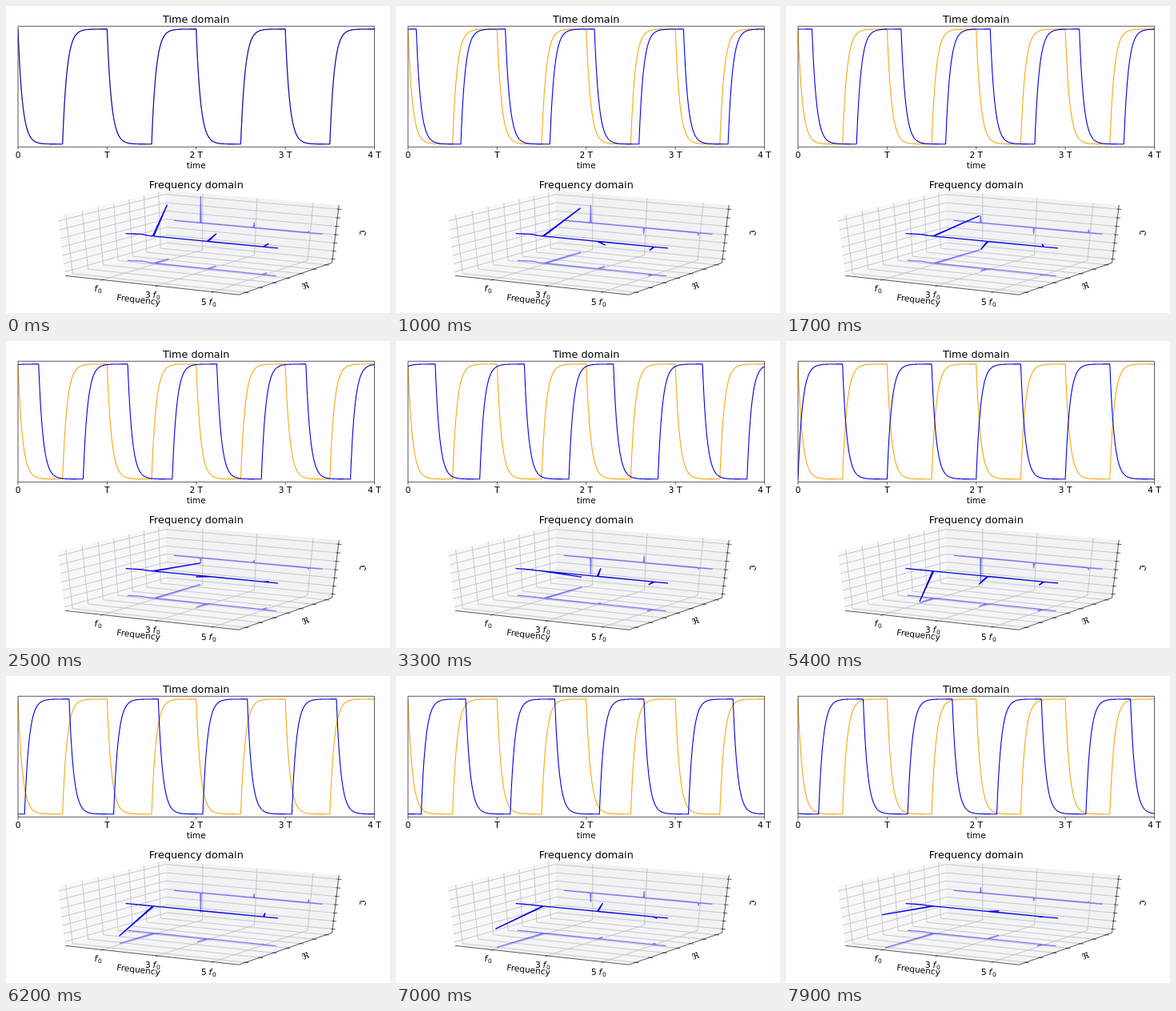
An HTML page with a canvas for the animation above (8000 ms loop, 480 by 384 pixels).

```html
<!DOCTYPE html>
<html>
<head>
<meta charset="utf-8">
<style>
html, body { margin: 0; width: 100%; height: 100%; overflow: hidden; background: #fefdff; }
canvas { display: block; }
</style>
</head>
<body>
<canvas id="stage" width="480" height="384"></canvas>
<script>
const ctx = document.getElementById('stage').getContext('2d');
const FONT = '"DejaVu Sans", sans-serif';
const TAU = 0.05;            // low-pass time constant, in periods
const EDGE = 0.5 + 1 / 48;   // half size of the 3D box
const LEFT = 15, TOP = 25.3, WIDTH = 445.5, HEIGHT = 151;
const SIN = 0.5, COS = Math.sqrt(3) / 2;
const HARMONICS = [1, 3, 5];
const GRID = [-3, -2, -1, 0, 1, 2, 3].map(i => i * 0.15);
const BLUE = '#0000e0', AXIS = '#222';
const freqPos = f => (f / 5.5 - 0.5) / 1.1;

// Perspective view: azimuth -60, elevation 30, distance 10.
function project(x, y, z) {
  const near = SIN * x - COS * y;
  const depth = 10 - near * COS - z * SIN;
  return [243.5 + 2405 * (COS * x + SIN * y) / depth,
          293.6 - 808 * (z * COS - near * SIN) / depth];
}

function trace(points) {
  ctx.beginPath();
  points.forEach(p => ctx.lineTo(p[0], p[1]));
}

function line(points, color, width) {
  trace(points);
  ctx.strokeStyle = color;
  ctx.lineWidth = width;
  ctx.stroke();
}

const line3 = (points, color, width) => line(points.map(p => project(...p)), color, width);

function pane(corners, color) {
  trace(corners.map(p => project(...p)));
  ctx.fillStyle = color;
  ctx.fill();
}

function text(str, x, y, size, angle = 0) {
  ctx.save();
  ctx.translate(x, y);
  ctx.rotate(angle * Math.PI / 180);
  ctx.font = size + 'px ' + FONT;
  ctx.textAlign = 'center';
  ctx.fillStyle = '#000';
  ctx.fillText(str, 0, 0);
  ctx.restore();
}

function freqLabel(num, x, y) {
  ctx.fillStyle = '#000';
  for (const [str, dx, dy, font] of [
    [num, 0, 0, '10.6px '],
    ['f', num ? 9.5 : 0, 0, 'italic 10.6px '],
    ['0', num ? 14 : 4.5, 2, '7.5px ']
  ]) {
    ctx.font = font + FONT;
    ctx.textAlign = 'left';
    ctx.fillText(str, x + dx, y + dy);
  }
}

function signal(t) {
  const p = t - Math.floor(t);
  return p < 0.5 ? 2 * Math.exp(-p / TAU) - 1 : 1 - 2 * Math.exp((0.5 - p) / TAU);
}

function drawWave(shift, color) {
  const points = [];
  for (let i = 0; i <= 1782; i++) {
    const t = i / 1782 * 4;
    points.push([LEFT + t / 4 * WIDTH, TOP + HEIGHT / 2 * (1 - signal(t - shift) / 1.05)]);
  }
  line(points, color, 1.1);
}

function drawTime(shift) {
  ctx.save();
  ctx.beginPath();
  ctx.rect(LEFT, TOP, WIDTH, HEIGHT);
  ctx.clip();
  drawWave(0, '#f8a810');
  drawWave(shift, BLUE);
  ctx.restore();
  ctx.strokeStyle = AXIS;
  ctx.lineWidth = 0.75;
  ctx.strokeRect(LEFT, TOP, WIDTH, HEIGHT);
  ['0', 'T', '2 T', '3 T', '4 T'].forEach((label, i) => {
    const x = LEFT + i * WIDTH / 4;
    line([[x, TOP + HEIGHT], [x, TOP + HEIGHT + 3.2]], AXIS, 0.75);
    text(label, x, 190, 10.6);
  });
  text('time', 237.7, 203, 10.6);
  text('Time domain', 237.7, 21, 12.8);
}

// Points [frequency, real, imaginary] of the shifted signal's spectrum.
function spectrum(shift) {
  const points = [];
  const ripple = 0.01 * (1 + Math.cos(2 * Math.PI * shift));
  for (let f = -0.03; f < 0.9; f += 0.05) {
    points.push([freqPos(f), ripple * Math.sin(Math.PI * f / 0.9) ** 2, 0]);
  }
  const scale = 0.5 * Math.hypot(1, 2 * Math.PI * TAU);
  for (const n of HARMONICS) {
    const lag = 2 * Math.PI * n * TAU;
    const size = scale / n / Math.hypot(1, lag);
    const phase = Math.PI / 2 - Math.atan(lag) - 2 * Math.PI * n * shift;
    points.push([freqPos(n - 0.02), 0, 0],
                [freqPos(n), size * Math.cos(phase), size * Math.sin(phase)],
                [freqPos(n + 0.02), 0, 0]);
  }
  points.push([freqPos(5.5), 0, 0]);
  return points;
}

function drawBox() {
  const e = EDGE, grey = '#bcbcbe';
  pane([[-e, -e, -e], [-e, e, -e], [-e, e, e], [-e, -e, e]], '#f8f7fa');
  pane([[-e, e, -e], [e, e, -e], [e, e, e], [-e, e, e]], '#f2f1f4');
  pane([[-e, -e, -e], [e, -e, -e], [e, e, -e], [-e, e, -e]], '#f5f4f7');
  for (const n of HARMONICS) {
    const x = freqPos(n);
    line3([[x, -e, -e], [x, e, -e], [x, e, e]], grey, 0.8);
  }
  for (const g of GRID) {
    line3([[e, g, -e], [-e, g, -e], [-e, g, e]], grey, 0.8);
    line3([[-e, -e, g], [-e, e, g], [e, e, g]], grey, 0.8);
  }
  line3([[-e, -e, -e], [e, -e, -e], [e, e, -e], [e, e, e]], AXIS, 0.75);
  const inner = e - 0.009, outer = e + 0.017;
  for (const n of HARMONICS) {
    const x = freqPos(n);
    line3([[x, -inner, -e], [x, -outer, -e]], AXIS, 0.75);
  }
  for (const g of GRID) {
    line3([[inner, g, -e], [outer, g, -e]], AXIS, 0.75);
    line3([[inner, e, g], [outer, e, g]], AXIS, 0.75);
  }
}

function drawFrequency(shift) {
  drawBox();
  const points = spectrum(shift);
  const pale = 'rgba(0,0,255,0.5)';
  line3(points.map(([x, re]) => [x, re, -0.5]), pale, 1.3);
  line3(points.map(([x, , im]) => [x, 0.5, im]), pale, 1.3);
  line3(points, BLUE, 1.3);
  freqLabel('', 110.5, 357);
  freqLabel('3', 174, 365);
  freqLabel('5', 244, 373.5);
  text('Frequency', 165.3, 371, 10.6, 6.5);
  text('ℜ', 375.5, 353.5, 10.6, -19);
  text('ℑ', 450, 284.5, 10.6, -84);
  text('Frequency domain', 237.7, 228, 12.8);
}

function draw() {
  const step = Math.floor(performance.now() / 100) % 80;
  const shift = step / 108;
  ctx.fillStyle = '#fefdff';
  ctx.fillRect(0, 0, 480, 384);
  ctx.lineJoin = 'round';
  drawTime(shift);
  drawFrequency(shift);
  requestAnimationFrame(draw);
}
draw();
</script>
</body>
</html>
```
